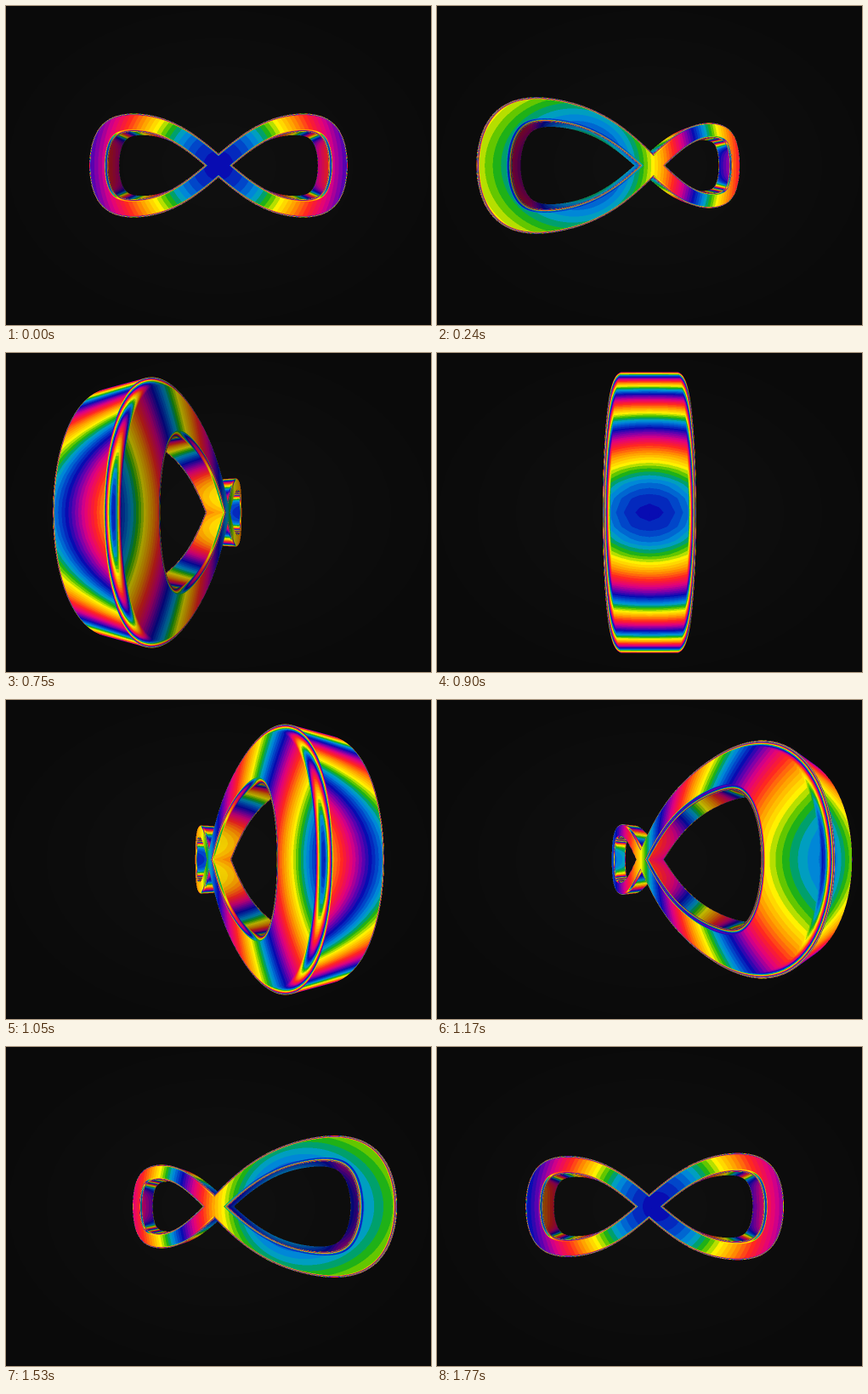
Recreate the animation shown at these times as an HTML page with a canvas. Size 500 by 375 pixels, loop 1.8 s.

```html
<!DOCTYPE html>
<html lang="en">
<head>
<meta charset="utf-8">
<title>Spinning rainbow infinity</title>
<style>
html, body { margin: 0; width: 100%; height: 100%; overflow: hidden; background: #0b0b0b; }
canvas { display: block; width: 500px; height: 375px; }
</style>
</head>
<body>
<canvas id="stage" width="500" height="375"></canvas>
<script>
const W = 500, H = 375, SS = 2, BW = W * SS, BH = H * SS;
const STEP = 30, STEPS = 60;
const ctx = document.getElementById('stage').getContext('2d');

// Solid: a bevelled bar swept along a figure eight, seen by a close camera.
const TIP = 142.5, RISE = 53.6, BLUNT = 2.6;
const HALF_W = 10.9, HALF_D = 12.3, BEVEL = 2.7;
const CAM = 191, FOCAL = CAM - HALF_D;
const SEGS = 240, ARC = 8, STRIPS = 8;
const LIGHT = [-0.35, 0.94], AMBIENT = 0.7;

// Colour cycles four times as the surface turns from facing to edge-on.
const CYCLES = 4, LEVELS = 26;
const STOPS = [
  [0, 8, 12, 178], [0.09, 0, 80, 205], [0.18, 0, 158, 220], [0.23, 0, 160, 110],
  [0.28, 40, 182, 0], [0.38, 255, 245, 0], [0.53, 255, 145, 0], [0.66, 255, 35, 35],
  [0.79, 225, 0, 130], [0.9, 115, 0, 175], [1, 8, 12, 178]
];

function rainbow(p) {
  const i = Math.max(1, STOPS.findIndex(s => s[0] >= p));
  const a = STOPS[i - 1], b = STOPS[i], f = (p - a[0]) / (b[0] - a[0]);
  return [1, 2, 3].map(c => a[c] + (b[c] - a[c]) * f);
}
const palette = Array.from({ length: LEVELS }, (_, i) => rainbow(i / LEVELS));

// Cross-section as [offset, depth, normal offset, normal depth].
function crossSection() {
  const ring = [], signs = [[1, 1], [-1, 1], [-1, -1], [1, -1]];
  const corner = (k, j) => {
    const a = (k + j / ARC) * Math.PI / 2, c = Math.cos(a), s = Math.sin(a);
    const [su, sz] = signs[k % 4];
    return [su * (HALF_W - BEVEL) + BEVEL * c, sz * (HALF_D - BEVEL) + BEVEL * s, c, s];
  };
  for (let k = 0; k < 4; k++) {
    for (let j = 0; j <= ARC; j++) ring.push(corner(k, j));
    const a = corner(k, ARC), b = corner(k + 1, 0);
    for (let j = 1; j < STRIPS; j++) ring.push(a.map((v, i) => v + (b[i] - v) * j / STRIPS));
  }
  return ring;
}

const ring = crossSection(), RING = ring.length, COUNT = SEGS * RING;
const mesh = [];
for (let i = 0; i < SEGS; i++) {
  const t = i / SEGS * 2 * Math.PI;
  const x = TIP * Math.cos(t), y = RISE * Math.sin(2 * t) + BLUNT * Math.sin(6 * t);
  const dx = -TIP * Math.sin(t), dy = 2 * RISE * Math.cos(2 * t) + 6 * BLUNT * Math.cos(6 * t);
  const len = Math.hypot(dx, dy), nx = dy / len, ny = -dx / len;
  for (const [u, z, nu, nz] of ring)
    mesh.push([x + nx * u, y + ny * u, z, nx * nu, ny * nu, nz]);
}

const X = new Float32Array(COUNT), Y = new Float32Array(COUNT);
const near = new Float32Array(COUNT), facing = new Float32Array(COUNT), lit = new Float32Array(COUNT);
const depth = new Float32Array(BW * BH), pixels = new Uint32Array(BW * BH);

function project(angle) {
  const c = Math.cos(angle), s = Math.sin(angle);
  mesh.forEach(([x, y, z, nx, ny, nz], i) => {
    const px = x * c + z * s, pz = z * c - x * s;
    const mx = nx * c + nz * s, mz = nz * c - nx * s;
    const dz = CAM - pz, k = FOCAL / dz;
    X[i] = (W / 2 + px * k) * SS;
    Y[i] = (H / 2 - y * k) * SS;
    near[i] = 1 / dz;
    facing[i] = (mz * dz - mx * px - ny * y) / Math.hypot(px, y, dz);
    lit[i] = Math.min(1, Math.max(0.45, AMBIENT + 0.5 * (mx * LIGHT[0] + mz * LIGHT[1])));
  });
}

function shade(cos, light) {
  const p = (1 - Math.min(1, Math.max(0, cos))) * CYCLES;
  const c = palette[Math.round(p * LEVELS) % LEVELS];
  return 0xff000000 | (c[0] * light) << 16 | (c[1] * light) << 8 | (c[2] * light);
}

function triangle(a, b, c) {
  const ax = X[a], ay = Y[a], bx = X[b], by = Y[b], cx = X[c], cy = Y[c];
  const area = (bx - ax) * (cy - ay) - (by - ay) * (cx - ax);
  if (Math.abs(area) < 1e-6) return;
  const x0 = Math.max(0, Math.ceil(Math.min(ax, bx, cx) - 0.5));
  const x1 = Math.min(BW - 1, Math.floor(Math.max(ax, bx, cx) - 0.5));
  const y0 = Math.max(0, Math.ceil(Math.min(ay, by, cy) - 0.5));
  const y1 = Math.min(BH - 1, Math.floor(Math.max(ay, by, cy) - 0.5));
  for (let y = y0; y <= y1; y++) {
    for (let x = x0; x <= x1; x++) {
      const px = x + 0.5, py = y + 0.5;
      const u = ((bx - px) * (cy - py) - (by - py) * (cx - px)) / area;
      const v = ((cx - px) * (ay - py) - (cy - py) * (ax - px)) / area;
      const w = 1 - u - v;
      if (u < -1e-5 || v < -1e-5 || w < -1e-5) continue;
      const q = u * near[a] + v * near[b] + w * near[c], at = y * BW + x;
      if (q <= depth[at]) continue;
      depth[at] = q;
      pixels[at] = shade(u * facing[a] + v * facing[b] + w * facing[c],
        u * lit[a] + v * lit[b] + w * lit[c]);
    }
  }
}

function backdrop(x, y) {
  const r = Math.hypot((x - W / 2) / 270, (y - H / 2) / 200);
  return 16 - 6 * Math.min(1, r);
}

function render(step) {
  depth.fill(0);
  pixels.fill(0);
  project(step * Math.PI / STEPS);
  for (let i = 0; i < SEGS; i++) {
    const p = i * RING, n = (i + 1) % SEGS * RING;
    for (let j = 0; j < RING; j++) {
      const k = (j + 1) % RING;
      if (Math.max(facing[p + j], facing[p + k], facing[n + j], facing[n + k]) <= 0) continue;
      triangle(p + j, p + k, n + k);
      triangle(p + j, n + k, n + j);
    }
  }
  const image = ctx.createImageData(W, H), out = image.data;
  for (let y = 0; y < H; y++) {
    for (let x = 0; x < W; x++) {
      const bg = backdrop(x, y);
      let r = 0, g = 0, b = 0;
      for (let k = 0; k < SS * SS; k++) {
        const v = pixels[(y * SS + (k >> 1)) * BW + x * SS + (k & 1)];
        r += v ? v >> 16 & 255 : bg;
        g += v ? v >> 8 & 255 : bg;
        b += v ? v & 255 : bg;
      }
      const o = (y * W + x) * 4;
      out[o] = r / 4;
      out[o + 1] = g / 4;
      out[o + 2] = b / 4;
      out[o + 3] = 255;
    }
  }
  return image;
}

const cache = [];
let shown = -1;
const start = performance.now();
function tick() {
  const step = Math.floor(Math.max(0, performance.now() - start) / STEP) % STEPS;
  if (step !== shown) {
    cache[step] = cache[step] || render(step);
    ctx.putImageData(cache[step], 0, 0);
    shown = step;
  }
  requestAnimationFrame(tick);
}
tick();
</script>
</body>
</html>
```
